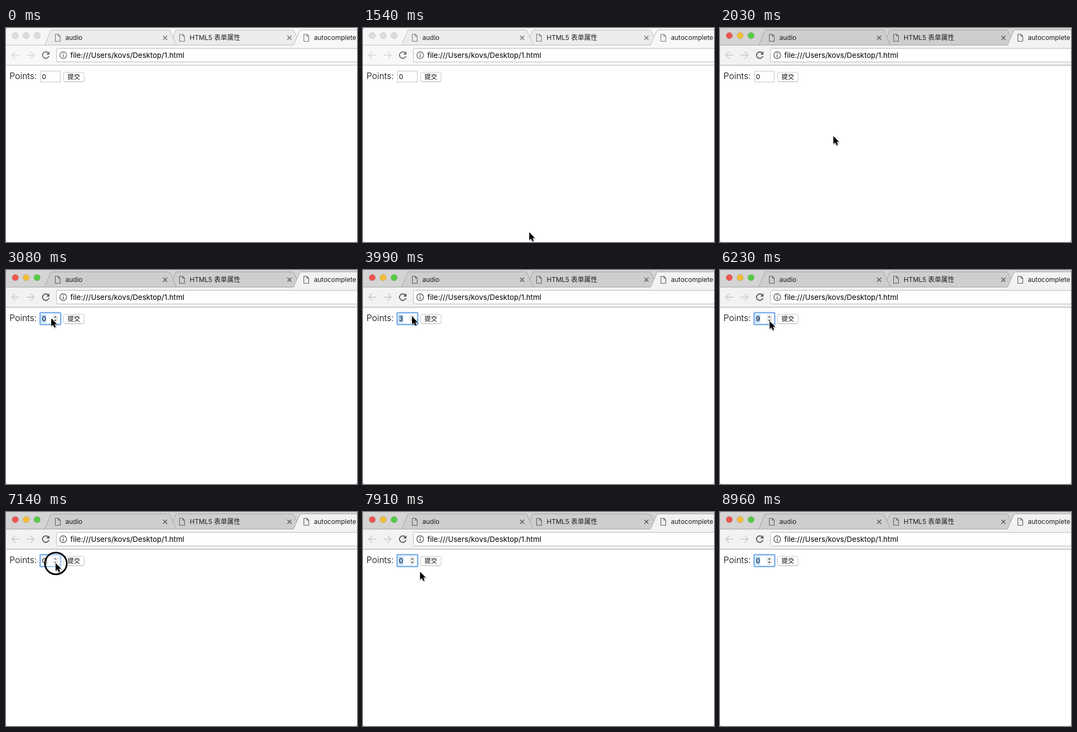
An HTML page that plays this animation: 644 px wide and 394 px high, repeating every 9.03 s.

```html
<!DOCTYPE html>
<html lang="zh-CN">
<head>
<meta charset="utf-8">
<style>
  html, body { margin: 0; width: 100%; height: 100%; overflow: hidden; background: #8c8c8c; }
  svg { display: block; width: 644px; height: 394px; border-radius: 4px 0 3px 3px; background: #fff;
        font: 12px Inter, "Noto Sans CJK SC", "Noto Sans CJK", sans-serif;
        --strip: #d4d4d4; --tab: #cecece; --bar: #f2f2f2; --edge: #a3a3a3; --nav: #d0d0d0; --icon: #5c5c5c; }
  svg.idle { --strip: #f6f6f6; --tab: #ececec; --bar: #f8f8f8; --edge: #bdbdbd; --nav: #dedede; --icon: #757575; }
  .idle .light { fill: #dcdcdc; stroke: #cfcfcf; }
  .light { stroke: #0002; }
  .strip { fill: var(--strip); }
  .tab { fill: var(--tab); stroke: var(--edge); }
  .bar { fill: var(--bar); }
  .edge { stroke: var(--edge); }
  .line { fill: none; stroke: var(--icon); }
  .nav { fill: none; stroke: var(--nav); stroke-width: 1.8; }
</style>
</head>
<body>
<svg id="win" viewBox="0 0 644 394">
  <defs>
    <path id="page" class="line" d="M.5 .5H6L9.5 4V13.5H.5ZM6 .5V4H9.5" stroke-width="1.1"/>
    <path id="close" class="line" d="M-3.7 -3.7L3.7 3.7M3.7 -3.7L-3.7 3.7" stroke-width="1.6"/>
  </defs>

  <rect class="strip" width="644" height="32"/>
  <circle class="light" cx="17" cy="14" r="5.8" fill="#f2544f"/>
  <circle class="light" cx="37" cy="14" r="5.8" fill="#f4bd35"/>
  <circle class="light" cx="57" cy="14" r="5.8" fill="#55cb45"/>
  <path class="tab" d="M300 31.5L311 5Q312 3.5 314 3.5H525Q527 3.5 528 5L540 31.5"/>
  <path class="tab" d="M71 31.5L82 5Q83 3.5 85 3.5H298Q300 3.5 301 5L312.500 31.500"/>
  <rect class="bar" y="32" width="644" height="36"/>
  <path class="edge" d="M0 31.500H528"/>
  <path class="bar" d="M527 32L539 5Q540 3.5 542 3.500H644V32Z"/>
  <path class="edge" fill="none" d="M527.500 31.500L539 5Q540 3.500 542 3.500H644"/>
  <path class="edge" d="M0 68.500H644"/>

  <use href="#page" x="90" y="11"/>
  <use href="#page" x="318" y="11"/>
  <use href="#page" x="546" y="11"/>
  <use href="#close" x="292" y="18"/>
  <use href="#close" x="520" y="18"/>
  <g fill="#1c1c1c">
    <text x="109" y="22">audio</text>
    <text x="337" y="22">HTML5 表单属性</text>
    <text x="565" y="22">autocomplete</text>
  </g>

  <path class="nav" d="M24 50H11M17 43.500L10.500 50L17 56.500M38 50H51M45 43.500L51.500 50L45 56.500"/>
  <path class="line" d="M77.500 46A6 6 0 1 0 78.800 51.500" stroke-width="1.9"/>
  <path d="M79.800 43V49H73.800Z" fill="var(--icon)"/>
  <rect x="92.500" y="37.500" width="570" height="25" rx="3" fill="#fff" stroke="#b9b9b9"/>
  <circle class="line" cx="105" cy="50" r="6.200" stroke-width="1.400"/>
  <path class="line" d="M105 46V47.700M105 49V53.800" stroke-width="1.600"/>
  <text x="118" y="55" font-size="13.500">file:///Users/kovs/Desktop/1.html</text>

  <text x="6.500" y="94" font-size="16" font-weight="300">Points:</text>
  <rect x="63.500" y="79.500" width="36" height="20" fill="#fff" stroke="#c4c4c4"/>
  <g id="focus">
    <rect x="62.500" y="78.500" width="38" height="22" rx="1.500" fill="none" stroke="#a9cbf3" stroke-width="3"/>
    <rect x="63" y="79" width="37" height="21" rx="1" fill="none" stroke="#72a9e8" stroke-width="1.500"/>
    <rect x="86.500" y="82.500" width="8" height="14" rx="3.500" fill="#fff" stroke="#cfcfcf"/>
    <path d="M88.700 87.500L90.500 85.500L92.300 87.500M88.700 91.500L90.500 93.500L92.300 91.500" fill="none" stroke="#333" stroke-width="1.200"/>
  </g>
  <rect id="selection" x="65" y="82" width="9" height="15" fill="#b3d5fd"/>
  <text id="value" x="66" y="94">0</text>
  <path id="caret" d="M74.500 83V97" stroke="#000"/>
  <rect x="105.500" y="82" width="38" height="17.500" rx="3.500" fill="#c4c4c4"/>
  <rect x="105.500" y="81.500" width="38" height="17" rx="3.500" fill="#fff" stroke="#c8c8c8"/>
  <text x="113" y="94" font-size="11.500">提交</text>

  <g id="pointer">
    <circle id="ring" cx=".5" cy=".7" r="20" fill="#fff" fill-opacity=".3" stroke="#000" stroke-width="3"/>
    <path d="M0 0V14.500L3.300 11.500L5.600 16.700L8.200 15.600L6 10.600H10.400Z" transform="translate(.6 1.600)" fill="#0003" stroke="#0002" stroke-width="2"/>
    <path d="M0 0V14.500L3.300 11.500L5.600 16.700L8.200 15.600L6 10.600H10.400Z" stroke="#fff" stroke-width="1" stroke-linejoin="round" paint-order="stroke"/>
  </g>
</svg>
<script>
const LOOP = 9030, STEP = 70, HOLD = 210;
const ACTIVE = 1610, ENTER = 1540, LEAVE = 8470;
// time, x, y of the pointer tip
const path = [
  [1540, 305, 376], [2030, 208, 199], [2380, 112, 111], [2590, 91, 95], [2870, 91, 95],
  [3080, 83, 89], [3430, 90, 86], [4620, 90, 85], [4830, 90, 83], [5740, 90, 85],
  [6020, 91, 94], [7840, 91, 94], [8050, 132, 142], [8400, 310, 370]
];
// press time and resulting value
const presses = [[2660, 0], [3640, 3], [4830, 6], [5530, 9], [6370, 6], [6720, 3], [7070, 0]];

const $ = id => document.getElementById(id);
const show = (id, on) => $(id).setAttribute("visibility", on ? "visible" : "hidden");

function pointerAt(t) {
  const i = path.findIndex(p => p[0] > t);
  if (i < 0) return path.at(-1).slice(1);
  const [t0, x0, y0] = path[Math.max(i - 1, 0)], [t1, x1, y1] = path[i];
  const k = Math.max(0, (t - t0) / (t1 - t0));
  return [x0 + (x1 - x0) * k, y0 + (y1 - y0) * k];
}

function draw(now) {
  const t = Math.floor(now % LOOP / STEP) * STEP;
  const press = presses.findLast(p => p[0] <= t);
  const held = !!press && t < press[0] + HOLD;
  const visible = t >= ENTER && t < LEAVE;
  $("win").setAttribute("class", t < ACTIVE ? "idle" : "");
  $("value").textContent = press ? press[1] : 0;
  show("focus", press);
  show("selection", press && !held);
  show("caret", held);
  show("pointer", visible);
  show("ring", held && t > press[0]);
  $("pointer").setAttribute("transform", `translate(${pointerAt(t)})`);
  requestAnimationFrame(loop);
}

const start = performance.now();
function loop() { draw(performance.now() - start); }
loop();
</script>
</body>
</html>
```
